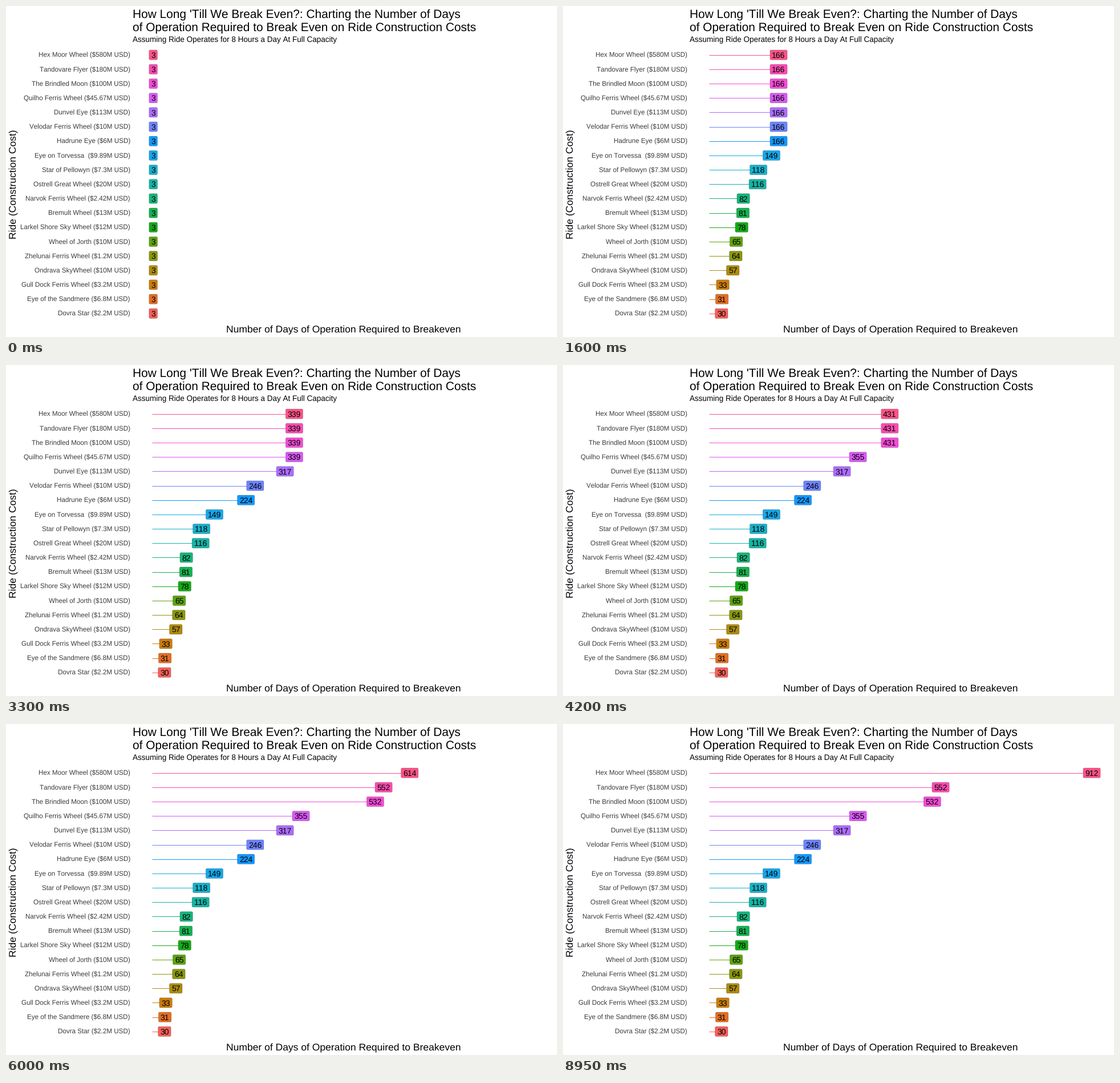
Recreate the animation shown at these times as a matplotlib script. Size 966 px wide and 580 px high, loop 10000 ms.

```python
import matplotlib.pyplot as plt
import numpy as np
from matplotlib.animation import FuncAnimation
from matplotlib.patches import FancyBboxPatch

W, H, DPI = 966, 580, 72          # at 72 dpi one point is one pixel
FRAMES, INTERVAL = 200, 50
START, RATE = 3.2, 5.09           # days shown at first, days added per frame
X0, X_SCALE = 255.8, 0.736
Y0, Y_STEP = 85.7, 25.17
LABEL_SIZE, BOX_H = 13.95, 17.2
DIGIT = 0.556 * LABEL_SIZE

# A high kerning factor switches pair kerning off.
plt.rcParams.update({"font.family": "Liberation Sans", "text.hinting": "none",
                     "text.kerning_factor": 6})

RIDES = [
    ("Hex Moor Wheel ($580M USD)", 912),
    ("Tandovare Flyer ($180M USD)", 552),
    ("The Brindled Moon ($100M USD)", 532),
    ("Quilho Ferris Wheel ($45.67M USD)", 355),
    ("Dunvel Eye ($113M USD)", 317),
    ("Velodar Ferris Wheel ($10M USD)", 246),
    ("Hadrune Eye ($6M USD)", 224),
    ("Eye on Torvessa  ($9.89M USD)", 149),
    ("Star of Pellowyn ($7.3M USD)", 118),
    ("Ostrell Great Wheel ($20M USD)", 116),
    ("Narvok Ferris Wheel ($2.42M USD)", 82),
    ("Bremult Wheel ($13M USD)", 81),
    ("Larkel Shore Sky Wheel ($12M USD)", 78),
    ("Wheel of Jorth ($10M USD)", 65),
    ("Zhelunai Ferris Wheel ($1.2M USD)", 64),
    ("Ondrava SkyWheel ($10M USD)", 57),
    ("Gull Dock Ferris Wheel ($3.2M USD)", 33),
    ("Eye of the Sandmere ($6.8M USD)", 31),
    ("Dovra Star ($2.2M USD)", 30),
]

XYZ_TO_RGB = np.array([[3.240479, -1.537150, -0.498535],
                       [-0.969256, 1.875992, 0.041556],
                       [0.055648, -0.204043, 1.057311]])
RGB_TO_SCREEN = np.array([[0.975, 0.025, 0], [-0.013, 1.013, 0], [0, 0.015, 0.985]])


def hue_color(deg, lum=65, chroma=100):
    """Evenly lit LUV hue, shown on a gamma 1.8 screen."""
    h = np.radians(deg)
    y = ((lum + 16) / 116) ** 3
    u = chroma * np.cos(h) / (13 * lum) + 0.1978398
    v = chroma * np.sin(h) / (13 * lum) + 0.4683363
    x = 9 * y * u / (4 * v)
    z = -x / 3 - 5 * y + 3 * y / v
    rgb = np.clip(XYZ_TO_RGB @ [x, y, z], 0, 1)
    return tuple(np.clip(RGB_TO_SCREEN @ rgb, 0, 1) ** (1 / 1.8))


fig = plt.figure(figsize=(W / DPI, H / DPI), dpi=DPI, facecolor="white")
ax = fig.add_axes([0, 0, 1, 1])
ax.set(xlim=(0, W), ylim=(H, 0))
ax.axis("off")


def write(x, y, text, size, **kw):
    return ax.text(x, y, text, fontsize=size, va="baseline", parse_math=False, **kw)


class Row:
    def __init__(self, i, name, days):
        self.y, self.days = Y0 + i * Y_STEP, days
        color = hue_color(15 + 360 * (len(RIDES) - 1 - i) / len(RIDES))
        write(217.8, self.y + 4.2, name, 11.63, ha="right", color="#3c3c3c")
        self.line, = ax.plot([], [], color=color, lw=1, snap=True,
                             solid_capstyle="butt", zorder=1)
        self.box = FancyBboxPatch((0, 0), 1, BOX_H, facecolor=color,
                                  boxstyle="round,pad=0,rounding_size=2.1",
                                  edgecolor=(0, 0, 0, 0.3), lw=0.62,
                                  snap=False, zorder=2)
        ax.add_patch(self.box)
        self.label = write(0, self.y + 5, "", LABEL_SIZE, ha="center",
                           color="black", zorder=3)

    def show(self, day):
        day = min(day, self.days)
        x, text = X0 + X_SCALE * day, f"{day:.0f}"
        width = DIGIT * len(text) + 6.9
        self.line.set_data([X0, x], [self.y, self.y])
        self.box.set_bounds(x - width / 2, self.y - BOX_H / 2, width, BOX_H)
        self.label.set_x(x)
        self.label.set_text(text)
        return self.line, self.box, self.label


write(222, 20.5, "How Long 'Till We Break Even?: Charting the Number of Days", 20.9)
write(222, 43.5, "of Operation Required to Break Even on Ride Construction Costs", 20.9)
write(222.5, 63, "Assuming Ride Operates for 8 Hours a Day At Full Capacity", 13.5)
write(591.5, 571.5, "Number of Days of Operation Required to Breakeven", 17.45, ha="center")
write(17.4, 312.5, "Ride (Construction Cost)", 17.45, ha="center",
      rotation=90, rotation_mode="anchor")

rows = [Row(i, name, days) for i, (name, days) in enumerate(RIDES)]


def update(frame):
    day = START + RATE * frame
    return [artist for row in rows for artist in row.show(day)]


anim = FuncAnimation(fig, update, frames=FRAMES, interval=INTERVAL,
                     init_func=lambda: update(0), repeat=True, repeat_delay=0)
plt.show()
```
